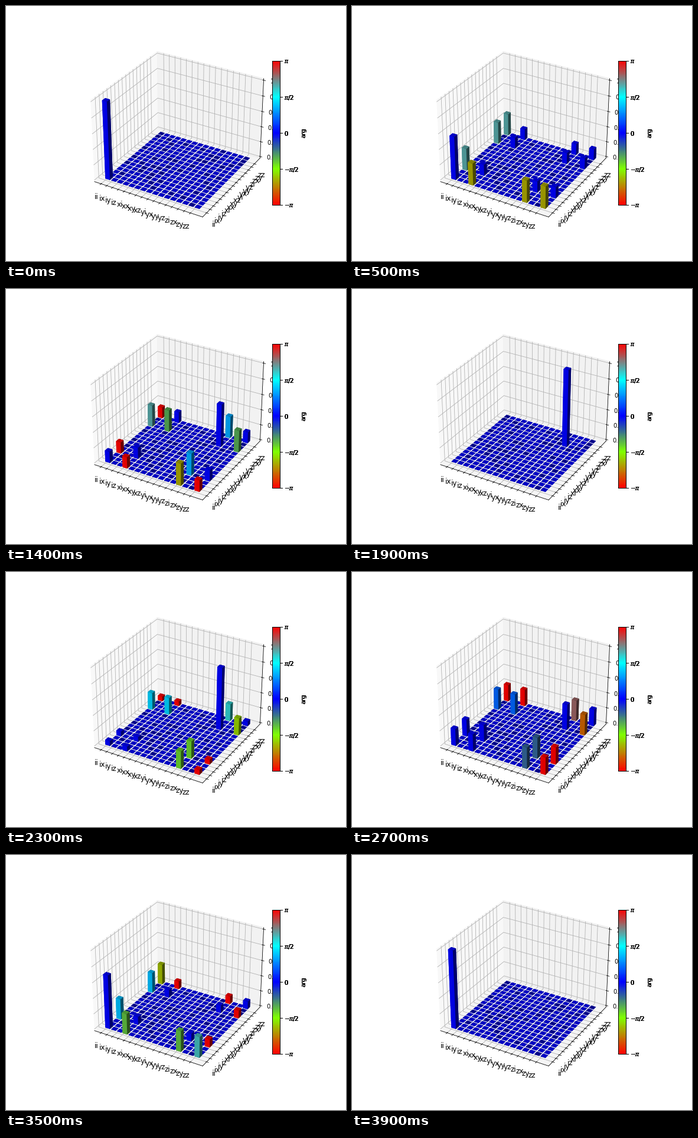
Animation, 576 px wide and 432 px high, one loop 5 s. Source, as a matplotlib script:

```python
"""Process matrix of a two-qubit gate that flips each basis state's phase in turn."""
from itertools import product

import matplotlib.pyplot as plt
import numpy as np
from matplotlib.animation import FuncAnimation
from matplotlib.cm import ScalarMappable
from matplotlib.colors import LinearSegmentedColormap, Normalize

DPI = 72
STEPS = 10          # frames per phase flip
FLIPS = 4           # one per basis state
HOLD = 10           # extra frames on the last pose
INTERVAL = 100
SIZE = 16
MARGIN = 1 / 48     # gap between the data limits and the panes

LABELS = ["".join(p) for p in product("ixyz", repeat=2)]
I, Z = np.array([1, 1]), np.array([1, -1])
DIAGONAL_OPS = {"ii": np.kron(I, I), "iz": np.kron(I, Z),
                "zi": np.kron(Z, I), "zz": np.kron(Z, Z)}

PHASE_CMAP = LinearSegmentedColormap.from_list(
    "phase",
    [(1, 0, 0), (0.5, 1, 0), (0, 0, 1), (0, 1, 1), (1, 0, 0)],
    N=256,
)
PHASE_NORM = Normalize(-np.pi, np.pi)


def chi_matrix(frame):
    """Process matrix in the Pauli basis for a frame number."""
    flip, step = divmod(min(frame, STEPS * FLIPS - 1), STEPS)
    gate = np.ones(FLIPS, dtype=complex)
    gate[:flip] = -1
    gate[flip] = np.exp(-1j * np.pi * step / (STEPS - 1))
    coeffs = np.zeros(SIZE, dtype=complex)
    for name, op in DIAGONAL_OPS.items():
        coeffs[LABELS.index(name)] = gate @ op / 4
    chi = np.outer(coeffs, coeffs.conj())
    chi[abs(chi) < 0.001] = 0
    return chi


def padded(low, high, margin):
    pad = (high - low) * margin
    return low - pad, high + pad


def make_axes(fig):
    ax = fig.add_subplot(projection="3d", azim=-60, elev=30)
    ax.set_position([0.125, 0.125, 0.65875, 0.755])
    ax.set_anchor((1.0, 0.5))
    ticks = np.arange(SIZE) - 0.5
    lims = padded(*padded(-0.5, SIZE - 0.7, 0.05), MARGIN)
    ax.set_xticks(ticks, LABELS)
    ax.set_yticks(ticks, LABELS)
    ax.set_zticks(np.linspace(0, 1, 6))
    ax.tick_params(axis="x", labelsize=12)
    ax.tick_params(axis="y", labelsize=12)
    ax.set_xlim(lims)
    ax.set_ylim(lims)
    ax.set_zlim(padded(0, 1, MARGIN))
    return ax


def add_colorbar(fig, filled=True):
    height = 0.56625
    cax = fig.add_axes([0.78375, 0.219375, height * 0.75 / 20, height])
    bar = fig.colorbar(ScalarMappable(PHASE_NORM, PHASE_CMAP), cax=cax)
    bar.set_ticks([-np.pi, -np.pi / 2, 0, np.pi / 2, np.pi],
                  labels=[r"$-\pi$", r"$-\pi/2$", r"$0$", r"$\pi/2$", r"$\pi$"])
    bar.set_label("arg")
    if not filled:
        bar.solids.set_visible(False)
        cax.patch.set_visible(False)


fig = plt.figure(figsize=(8, 6), dpi=DPI, facecolor="white")
ax = make_axes(fig)
add_colorbar(fig)
# Stacked copies give the scale its heavy lettering.
for _ in range(6):
    add_colorbar(fig, filled=False)

rows, cols = (g.ravel() - 0.5 for g in np.indices((SIZE, SIZE)))
bars = []


def update(frame):
    while bars:
        bars.pop().remove()
    chi = chi_matrix(frame).ravel()
    colors = PHASE_CMAP(PHASE_NORM(np.angle(chi)))
    bars.append(ax.bar3d(rows, cols, np.zeros(SIZE**2), 0.8, 0.8, abs(chi),
                         color=colors))
    return bars


anim = FuncAnimation(fig, update, frames=STEPS * FLIPS + HOLD,
                     init_func=lambda: update(0), interval=INTERVAL,
                     repeat=True, repeat_delay=0, blit=False)
plt.show()
```
